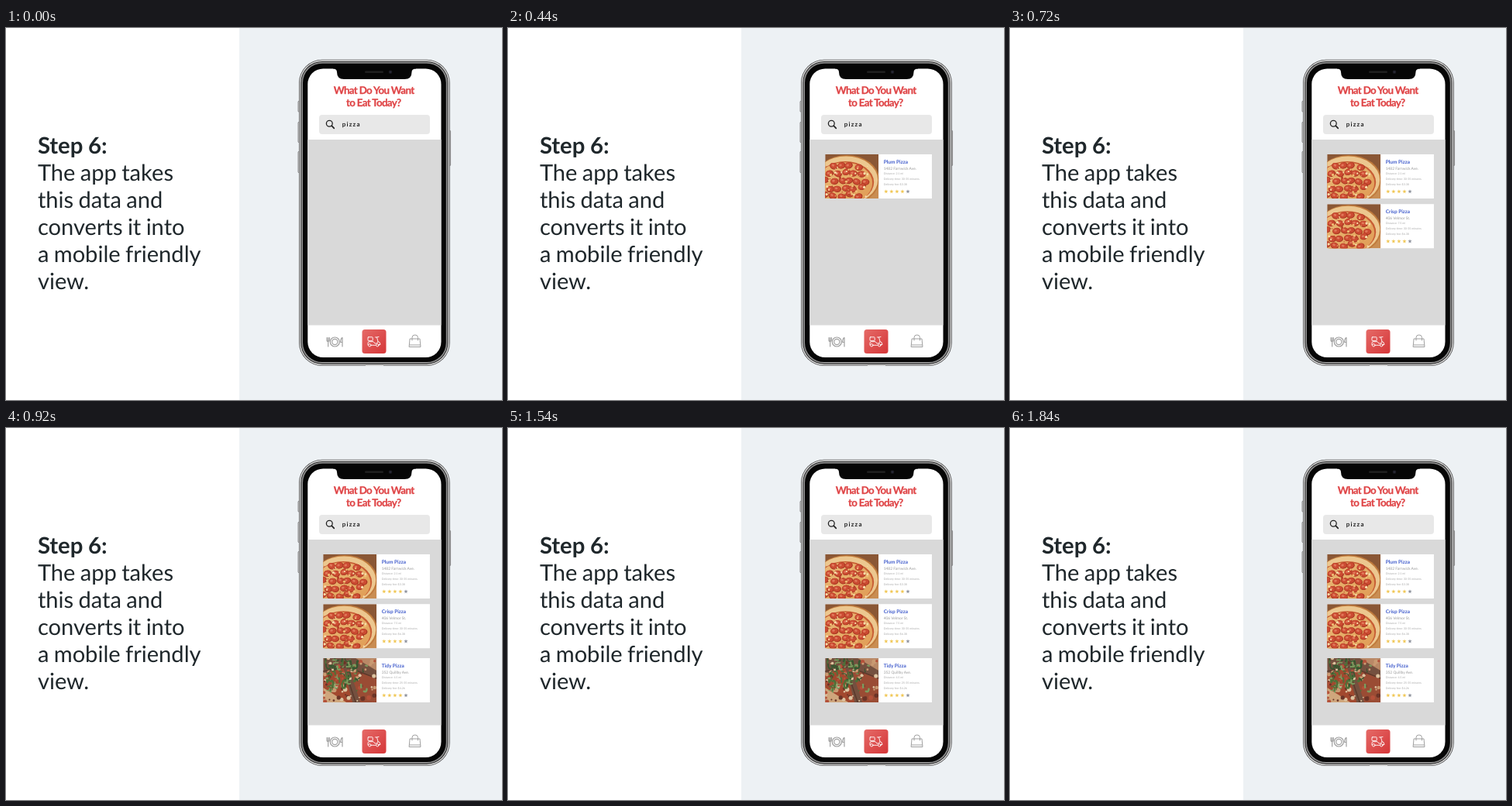
Write an HTML page that moves like this. It is 640 px wide and 480 px high and loops after 4.06 s.

```html
<!DOCTYPE html>
<html lang="en">
<head>
<meta charset="utf-8">
<title>Step 6</title>
<style>
  html, body { margin: 0; width: 100%; height: 100%; overflow: hidden; background: #fff; }
  svg { display: block; width: 100vw; height: 100vh; }
  text { font-family: Lato, "Open Sans", sans-serif; text-rendering: geometricPrecision; }
  .copy { font-size: 29.1px; word-spacing: -1.1px; fill: #1f272b; }
  .step { font-size: 29.33px; font-weight: 700; word-spacing: -.5px; fill: #1f272b; }
  .head { font-size: 13.33px; font-weight: 700; letter-spacing: -.05em; fill: #df4446;
    stroke: #df4446; stroke-width: .25; text-anchor: middle; }
  .query { font-size: 8px; font-weight: 700; letter-spacing: 1.2px; fill: #222; }
  .title { font-size: 6.5px; font-weight: 700; fill: #405ccc; }
  .address { font-size: 4.9px; fill: #999; }
  .detail { font-size: 3.6px; fill: #a8a8a8; }
  .line { fill: none; stroke-linecap: round; stroke-linejoin: round; }
</style>
</head>
<body>
<svg viewBox="0 0 640 480" xmlns="http://www.w3.org/2000/svg">
  <defs>
    <linearGradient id="red" x1="0" x2="1" y1="0" y2="1">
      <stop offset="0" stop-color="#e56a67"/>
      <stop offset="1" stop-color="#d53638"/>
    </linearGradient>
    <linearGradient id="cheese" x1="0" x2="1" y1="0" y2="1">
      <stop offset="0" stop-color="#ecbd7c"/>
      <stop offset="1" stop-color="#df9a52"/>
    </linearGradient>
    <clipPath id="photo"><rect width="69" height="57"/></clipPath>
  </defs>

  <rect width="640" height="480" fill="#fff"/>
  <rect x="301" width="339" height="480" fill="#edf1f4"/>
  <g id="copy"></g>

  <g id="phone">
    <g fill="#d0d0d0" stroke="#666" stroke-width=".6">
      <rect x="376.900" y="94.500" width="2" height="13.500" rx=".6"/>
      <rect x="376.900" y="121.500" width="2" height="26" rx=".6"/>
      <rect x="376.900" y="159.500" width="2" height="27" rx=".6"/>
      <rect x="571.600" y="132.500" width="2" height="45" rx=".6"/>
    </g>
    <g id="rings"></g>
    <rect x="464" y="434.300" width="23" height="1.700" fill="#c4c4c4"/>
    <rect x="389.300" y="52.500" width="172.200" height="372.500" rx="20" fill="#fff"/>
    <path d="M422 51H529V52.500Q523.500 52.500 523.500 57Q523.500 66 514.500 66H436Q427 66 427 57Q427 52.500 422 52.500Z" fill="#060606"/>
    <rect x="463" y="55.600" width="24" height="2.400" rx="1.200" fill="#202020"/>
    <circle cx="496" cy="56.800" r="2.300" fill="#1b1b22"/>
    <circle cx="496" cy="56.800" r="1" fill="#2d2d3c"/>
  </g>

  <text class="head" x="474.600" y="84.600">What Do You Want</text>
  <text class="head" x="474.300" y="100.700">to Eat Today?</text>
  <rect x="404" y="112" width="143" height="25" rx="4" fill="#e8e8e8"/>
  <g class="line" stroke="#222" stroke-width="1.300">
    <circle cx="417.300" cy="123.300" r="3.900"/>
    <path d="M420.200 126.200L423.300 129.300" stroke-width="1.700"/>
  </g>
  <text class="query" x="433.700" y="127.200">pizza</text>
  <rect x="389.300" y="144" width="172.200" height="239.500" fill="#d9d9d9"/>

  <g class="line" stroke="#a0a0a0" stroke-width="1.200">
    <circle cx="424.300" cy="405" r="6"/>
    <circle cx="424.300" cy="405" r="3.600"/>
    <path d="M414 399.500V402.500Q414 404.500 415.700 404.500Q417.400 404.500 417.400 402.500V399.500M415.700 399.500V411"/>
    <path d="M434 411V399.500Q431.700 400.500 431.700 405.500H434"/>
    <path d="M521.500 401H534L535 411.500H520.500ZM524 403V399.500Q524 396 527.800 396Q531.500 396 531.500 399.500V403M520.800 409H534.700" stroke-width="1"/>
  </g>
  <rect x="459.500" y="389" width="31" height="31" rx="3.500" fill="url(#red)"/>
  <g class="line" stroke="#fff" stroke-width=".9">
    <rect x="467" y="398.800" width="6.200" height="4.800" rx=".8"/>
    <path d="M467 409V406.500Q467 404.700 469 404.700H474L476 407H478.500L480 404.500L478.500 399H476.500M480 404.500Q483 405 483 408.500H481M471.500 409.300H477"/>
    <circle cx="469.300" cy="409.300" r="1.700"/>
    <circle cx="479.300" cy="409.300" r="1.700"/>
    <path d="M478.500 399L481 398.500"/>
  </g>
  <g id="cards"></g>
</svg>

<script>
const LOOP = 4060;
const $ = id => document.getElementById(id);
const text = (cls, x, y, str) => `<text class="${cls}" x="${x}" y="${y}">${str}</text>`;
const dot = (x, y, r, fill) => `<circle cx="${x}" cy="${y}" r="${r}" fill="${fill}"/>`;

function seeded(seed) {
  return () => (seed = (seed * 16807) % 2147483647) / 2147483647;
}

// Phone body layer, inset from the outer edge.
function ring(inset, fill) {
  return `<rect x="${378 + inset}" y="${40.7 + inset}" width="${194.8 - 2 * inset}"
    height="${395.4 - 2 * inset}" rx="${30 - inset}" fill="${fill}"/>`;
}

function star(cx, cy, r, fill) {
  const points = Array.from({ length: 10 }, (_, i) => {
    const a = i * Math.PI / 5 - Math.PI / 2, d = i % 2 ? r * .42 : r;
    return `${(cx + d * Math.cos(a)).toFixed(2)},${(cy + d * Math.sin(a)).toFixed(2)}`;
  });
  return `<polygon points="${points.join(" ")}" fill="${fill}"/>`;
}

function pepperoniPhoto() {
  const rnd = seeded(71);
  let out = `<rect width="69" height="57" fill="#8a5735"/>
    <path d="M50 57L69 36V57Z" fill="#c98d52"/>
    <ellipse cx="28" cy="33" rx="42" ry="32" fill="#c07a3c"/>
    <ellipse cx="27" cy="33" rx="41" ry="30.500" fill="#ecc78f"/>
    <ellipse cx="26" cy="36" rx="37" ry="27" fill="#c85d34"/>
    <ellipse cx="25" cy="37" rx="36" ry="26.500" fill="url(#cheese)"/>`;
  for (let row = 0; row < 5; row++) {
    for (let col = 0; col < 6; col++) {
      const x = col * 10.5 + (row % 2) * 5 + rnd() * 4 - 2, y = 15 + row * 9.5 + rnd() * 4 - 2;
      if (Math.hypot((x - 25) / 34, (y - 37) / 25) > 1) continue;
      out += `<g transform="translate(${x} ${y}) rotate(${rnd() * 60 - 30}) scale(1 .78)">
        ${dot(0, 0, 5.3, "#a53420")}${dot(-.3, -.4, 4.5, "#cb4b32")}${dot(-1.2, -1, 1.8, "#e0795a")}</g>`;
    }
  }
  for (let i = 0; i < 50; i++) {
    out += dot(rnd() * 56, 13 + rnd() * 43, .5 + rnd() * 1.3, ["#f6dca8", "#efbe74", "#b8462b"][i % 3]);
  }
  return out;
}

function greensPhoto() {
  const rnd = seeded(29);
  let out = `<rect width="69" height="57" fill="#74503f"/>
    <path d="M0 20L26 12L38 57H0Z" fill="#a2492f"/>
    <path d="M34 14L69 24V57H48Z" fill="#9a4c34"/>
    <path d="M0 38L30 57H0Z" fill="#cfa67c"/>
    <path d="M42 0H69V16Z" fill="#b98866"/>
    <path d="M33 30L42 57M0 17L30 11L69 26" class="line" stroke="#5a3a2c" stroke-width="1.500"/>`;
  for (let i = 0; i < 70; i++) {
    out += dot(rnd() * 69, rnd() * 57, .8 + rnd() * 2.2, ["#dcc3a0", "#b4513a", "#6b3427", "#c99a72"][i % 4]);
  }
  for (let i = 0; i < 75; i++) {
    const x = 3 + rnd() * 52, y = 2 + rnd() * 42, dx = rnd() * 12 - 6, dy = rnd() * 12 - 6;
    const tone = ["#4d7038", "#7c9c5f", "#385630"][i % 3];
    out += `<path class="line" d="M${x} ${y}q${dx} ${-dy / 2} ${dx} ${dy}" stroke="${tone}" stroke-width="${1 + rnd() * 1.6}"/>`;
  }
  return out;
}

const cards = [
  { at: 280, y: 163, photo: pepperoniPhoto, title: "Plum Pizza", address: "1482 Farnwick Ave.",
    miles: "2.1", wait: "30-35", fee: "3.38" },
  { at: 620, y: 227.2, photo: pepperoniPhoto, title: "Crisp Pizza", address: "406 Velmor St.",
    miles: "7.5", wait: "30-35", fee: "6.38" },
  { at: 900, y: 297, photo: greensPhoto, title: "Tidy Pizza", address: "352 Quillby Ave.",
    miles: "4.5", wait: "25-35", fee: "4.26" }
];

function cardMarkup(c) {
  const stars = [0, 1, 2, 3, 4].map(i => star(78.6 + i * 7.05, 48, 2.8, i < 4 ? "#f1c858" : "#8f939d"));
  return `<g transform="translate(409.2 ${c.y})">
    <rect width="137.700" height="57" fill="#fff"/>
    <g clip-path="url(#photo)">${c.photo()}</g>
    ${text("title", 75.5, 12.2, c.title)}
    ${text("address", 75.5, 19.6, c.address)}
    ${text("detail", 75.6, 26.2, `Distance: ${c.miles} mi`)}
    ${text("detail", 75.6, 32.8, `Delivery time: ${c.wait} minutes`)}
    ${text("detail", 75.6, 39.6, `Delivery fee: $${c.fee}`)}
    ${stars.join("")}
  </g>`;
}

$("copy").innerHTML = ["Step 6:", "The app takes", "this data and", "converts it into", "a mobile friendly", "view."]
  .map((line, i) => text(i ? "copy" : "step", 40.9, 162 + i * 35, line)).join("");
$("rings").innerHTML = ring(0, "#555") + ring(.9, "#e2e2e2") + ring(2.2, "#2a2a2a")
  + ring(3.2, "#8c8c8c") + ring(5, "#060606");
$("cards").innerHTML = cards.map(cardMarkup).join("");
const nodes = [...$("cards").children];

function render(t) {
  nodes.forEach((node, i) => node.setAttribute("visibility", t >= cards[i].at ? "visible" : "hidden"));
}

const start = performance.now();
function tick() {
  render((performance.now() - start) % LOOP);
  requestAnimationFrame(tick);
}
tick();
</script>
</body>
</html>
```
